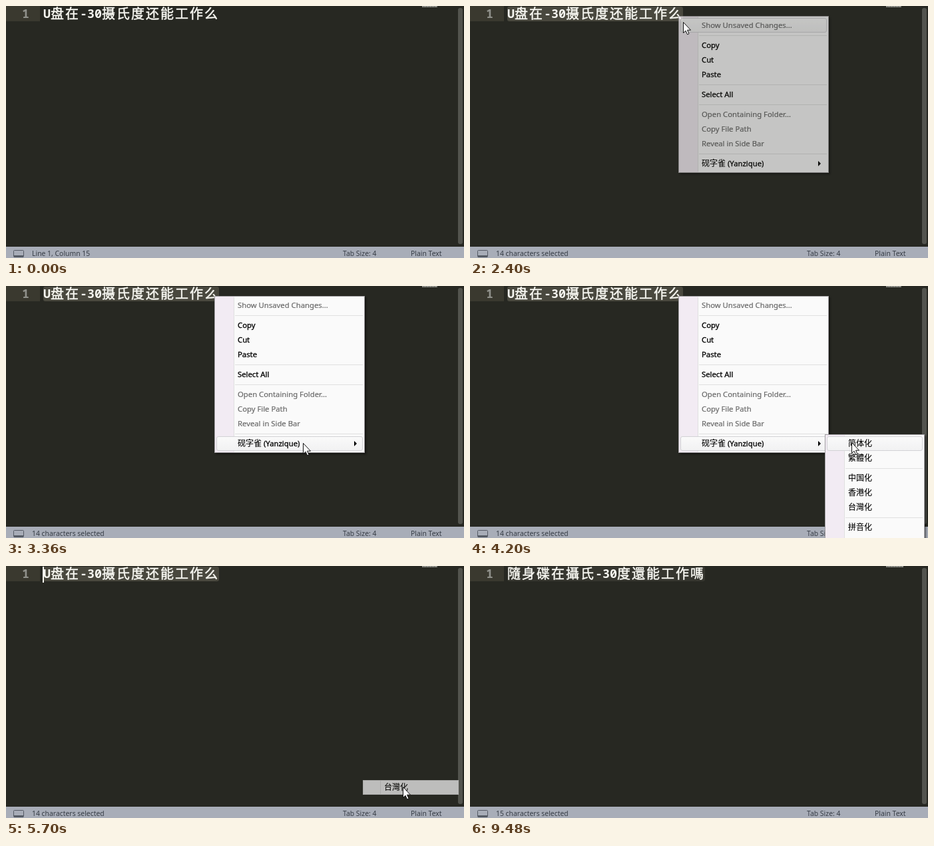
Write an HTML page that moves like this. It is 688x379 px and loops after 9540 ms.

```html
<!DOCTYPE html>
<html lang="zh-Hans">
<head>
<meta charset="utf-8">
<title>Editor text conversion</title>
<style>
  html, body { margin: 0; width: 100%; height: 100%; overflow: hidden; background: #272822; }
  svg { display: block; width: 100%; height: 100%; }
  text { white-space: pre; }
  .latin { font: 600 18.33px "Noto Sans Mono", "DejaVu Sans Mono", monospace; fill: #f8f8f2; }
  .han {
    font: 400 20px "Noto Sans CJK SC", "Noto Sans CJK", sans-serif;
    letter-spacing: 2px; fill: #f8f8f2; stroke: #f8f8f2; stroke-width: .5px;
  }
  .number { fill: #8f908a; }
  .status { font: 10.4px "Noto Sans", "Open Sans", sans-serif; fill: #363c45; }
  .item {
    font: 11.3px "Noto Sans", "Open Sans", "Noto Sans CJK SC", "Noto Sans CJK", sans-serif;
    fill: #000; stroke: #000; stroke-width: .3px;
  }
  .item.off { fill: #6a6a6a; stroke: #6a6a6a; stroke-width: .2px; }
  .item .cjk, .item.cjk { font-size: 12px; stroke-width: .1px; }
  .menu { filter: drop-shadow(2px 2px 1.5px rgba(0, 0, 0, .5)); }
  .rule { fill: #e0e0e0; }
  .hover { fill: url(#glow); stroke: #d2d2d5; }
</style>
</head>
<body>
<svg viewBox="0 0 688 379">
  <defs>
    <linearGradient id="glow" x2="0" y2="1">
      <stop stop-color="#fafafa"/><stop offset="1" stop-color="#f1f1f2"/>
    </linearGradient>
    <pattern id="tiny" width="4" height="3" patternUnits="userSpaceOnUse">
      <rect width="4" height="2" fill="#73746e"/>
      <rect width="3" height="2" fill="#8c8d87"/>
    </pattern>
  </defs>

  <rect width="688" height="379" fill="#272822"/>
  <rect width="51" height="23" fill="#3a392f"/>
  <text id="number" class="latin number" x="24" y="18">1</text>
  <rect id="selection" y="1" height="22" rx="3" fill="#49483e"/>
  <g id="before"></g>
  <g id="after"></g>
  <rect id="caret" y="1" width="2" height="24" fill="#f8f8f0"/>
  <rect id="minimap" x="625" width="23" height="2" fill="url(#tiny)"/>
  <rect x="679" y="3" width="7" height="355" rx="3" fill="#53544e"/>

  <rect y="362" width="688" height="17" fill="#a8adb8"/>
  <rect x="11.5" y="367.5" width="15" height="10" rx="1" fill="none" stroke="#555b65"/>
  <rect x="12" y="375" width="14" height="3" fill="#555b65"/>
  <text id="status" class="status" x="39" y="376"></text>
  <text class="status" x="506" y="376">Tab Size: 4</text>
  <text class="status" x="608" y="376">Plain Text</text>

  <g id="main" class="menu"></g>
  <g id="sub" class="menu"></g>
  <g id="picked">
    <rect x="536.5" y="322.5" width="143" height="21" fill="#f6f6f6" stroke="#dcdcdc"/>
    <rect x="562" y="323" width="1" height="20" class="rule"/>
    <text class="item cjk" x="568" y="337">台灣化</text>
  </g>
  <path id="arrow" d="M.5 .5V16.5L4 13.2L6.6 18.8L9 17.7L6.5 12.2H11.5Z" fill="#fff" stroke="#111"/>
</svg>

<script>
const LOOP = 9540, STEP = 60, TEXT_X = 56;
const $ = id => document.getElementById(id);
const show = (el, on) => el.setAttribute("visibility", on ? "visible" : "hidden");
const within = (t, from, to) => t >= from && t < to;

// Linear interpolation through [time, ...values] points.
function track(points, t) {
  const i = points.findIndex(p => p[0] > t);
  if (i === 0) return points[0].slice(1);
  if (i < 0) return points[points.length - 1].slice(1);
  const a = points[i - 1], b = points[i], k = (t - a[0]) / (b[0] - a[0]);
  return a.slice(1).map((v, j) => v + (b[j + 1] - v) * k);
}

// Fills a group with a code line; returns the x of every character boundary.
function codeLine(id, line) {
  const edges = [TEXT_X];
  let x = TEXT_X, html = "";
  for (const run of line.match(/[\x20-\x7e]+|[^\x20-\x7e]+/g)) {
    const latin = run.charCodeAt(0) < 127;
    html += `<text class="${latin ? "latin" : "han"}" x="${x}" y="${latin ? 18 : 19}">${run}</text>`;
    for (const _ of run) edges.push(x += latin ? 11 : 22);
  }
  $(id).innerHTML = html;
  return edges;
}

// Builds a popup menu; "-" is a rule, a leading "!" marks a disabled item.
function buildMenu(id, x, y, width, height, items, cls = "") {
  let html = `<rect x="${x + .5}" y="${y + .5}" width="${width - 1}" height="${height - 1}" fill="#fafafa" stroke="#a2a0a3"/>
    <rect x="${x + 1}" y="${y + 1}" width="29" height="${height - 2}" fill="#f2ebf3"/>
    <rect x="${x + 29}" y="${y + 2}" width="1" height="${height - 4}" class="rule"/>
    <rect class="hover" x="${x + 3.5}" width="${width - 7}" height="21" rx="2.5"/>`;
  const rows = [];
  let top = y + 3;
  for (const item of items) {
    if (item === "-") {
      html += `<rect x="${x + 31}" y="${top + 4}" width="${width - 34}" height="1" class="rule"/>`;
      top += 8;
      continue;
    }
    const off = item[0] === "!";
    html += `<text class="item ${off ? "off" : cls}" x="${x + 35}" y="${top + 15}">${off ? item.slice(1) : item}</text>`;
    rows.push(top);
    top += 22;
  }
  const group = $(id);
  group.innerHTML = html;
  const hover = group.querySelector(".hover");
  return {
    group, rows,
    labels: group.querySelectorAll("text"),
    rowAt: py => rows.findIndex(r => py >= r && py <= r + 22),
    highlight(row) {
      hover.setAttribute("opacity", row < 0 ? 0 : 1);
      if (row >= 0) hover.setAttribute("y", rows[row] + .5);
    }
  };
}

const beforeEdges = codeLine("before", "U盘在-30摄氏度还能工作么");
const afterEdges = codeLine("after", "隨身碟在攝氏-30度還能工作嗎");

const main = buildMenu("main", 313, 15, 226, 236, [
  "!Show Unsaved Changes...", "-", "Copy", "Cut", "Paste", "-", "Select All", "-",
  "!Open Containing Folder...", "!Copy File Path", "!Reveal in Side Bar", "-",
  '<tspan class="cjk">砚字雀</tspan> (Yanzique)'
]);
main.group.insertAdjacentHTML("beforeend", '<path d="M523 233V241L527 237Z"/>');
const sub = buildMenu("sub", 533, 223, 150, 200, [
  "简体化", "繁體化", "-", "中国化", "香港化", "台灣化", "-", "拼音化"
], "cjk");
const PASTE = 3, LAST = main.rows.length - 1;

const pointer = [
  [1440, 42, 6], [1500, 26, 4], [1560, 26, 4], [1620, 38, 6],
  [2280, 313, 15], [2400, 320, 24], [2700, 380, 80], [2940, 410, 114],
  [3240, 430, 236], [3540, 470, 236], [3900, 530, 236], [4200, 573, 235],
  [4500, 584, 257], [4560, 584, 257], [5160, 596, 332]
];
const drag = [[720, 459], [1500, 26]];
const blink = [
  [720, 0], [780, 1], [2040, 1], [2160, 0], [2520, 0], [2640, 1], [2940, 1], [3060, 0],
  [3480, 0], [3600, 1], [3960, 1], [4080, 0], [4500, 0], [4620, 1], [4980, 1], [5160, 0],
  [5520, 0], [5580, 1], [7440, 1], [7680, 0], [8100, 0], [8280, 1], [8520, 1], [8700, 0],
  [8940, 0], [9120, 1], [9420, 1], [9480, 0]
];
const mainFade = [[2220, 0], [2460, 1]];
const subFade = [[3420, 0], [3600, 1]];
const pickedFade = [[5610, 1], [5940, 0]];

function nearest(edges, x) {
  let best = 0;
  edges.forEach((e, i) => { if (Math.abs(e - x) < Math.abs(edges[best] - x)) best = i; });
  return best;
}

function drawEditor(t) {
  const converted = t >= 7140;
  const edges = converted ? afterEdges : beforeEdges;
  const end = edges.length - 1;
  const from = converted ? 0 : nearest(edges, track(drag, t)[0]);
  const count = end - from;
  show($("before"), !converted);
  show($("after"), converted);
  show($("number"), !within(t, 1440, 1620));
  $("selection").setAttribute("x", edges[from]);
  $("selection").setAttribute("width", edges[end] - edges[from]);
  $("selection").setAttribute("opacity", t >= 9480 ? .45 : 1);
  $("caret").setAttribute("x", edges[converted ? end : from] - 1);
  $("caret").setAttribute("opacity", track(blink, t)[0]);
  $("minimap").setAttribute("width", converted ? 26 : 23);
  $("status").textContent = count
    ? `${count} character${count > 1 ? "s" : ""} selected`
    : "Line 1, Column 15";
}

function drawMenus(t, x, y) {
  const open = t < 5580;
  main.group.setAttribute("opacity", open ? track(mainFade, t)[0] : 0);
  sub.group.setAttribute("opacity", open ? track(subFade, t)[0] : 0);
  const inSub = t >= 3480 && x >= 536;
  main.highlight(inSub ? LAST : main.rowAt(y));
  sub.highlight(inSub ? sub.rowAt(y) : -1);
  show(main.labels[PASTE], !within(t, 2940, 3000));
  $("picked").setAttribute("opacity", open ? 0 : track(pickedFade, t)[0]);
}

function draw() {
  const t = Math.floor(performance.now() % LOOP / STEP) * STEP;
  const [x, y] = track(pointer, t).map(Math.round);
  drawEditor(t);
  drawMenus(t, x, y);
  $("arrow").setAttribute("transform", `translate(${x} ${y})`);
  show($("arrow"), within(t, 1440, 1680) || within(t, 2280, 9000));
  requestAnimationFrame(draw);
}
draw();
</script>
</body>
</html>
```
